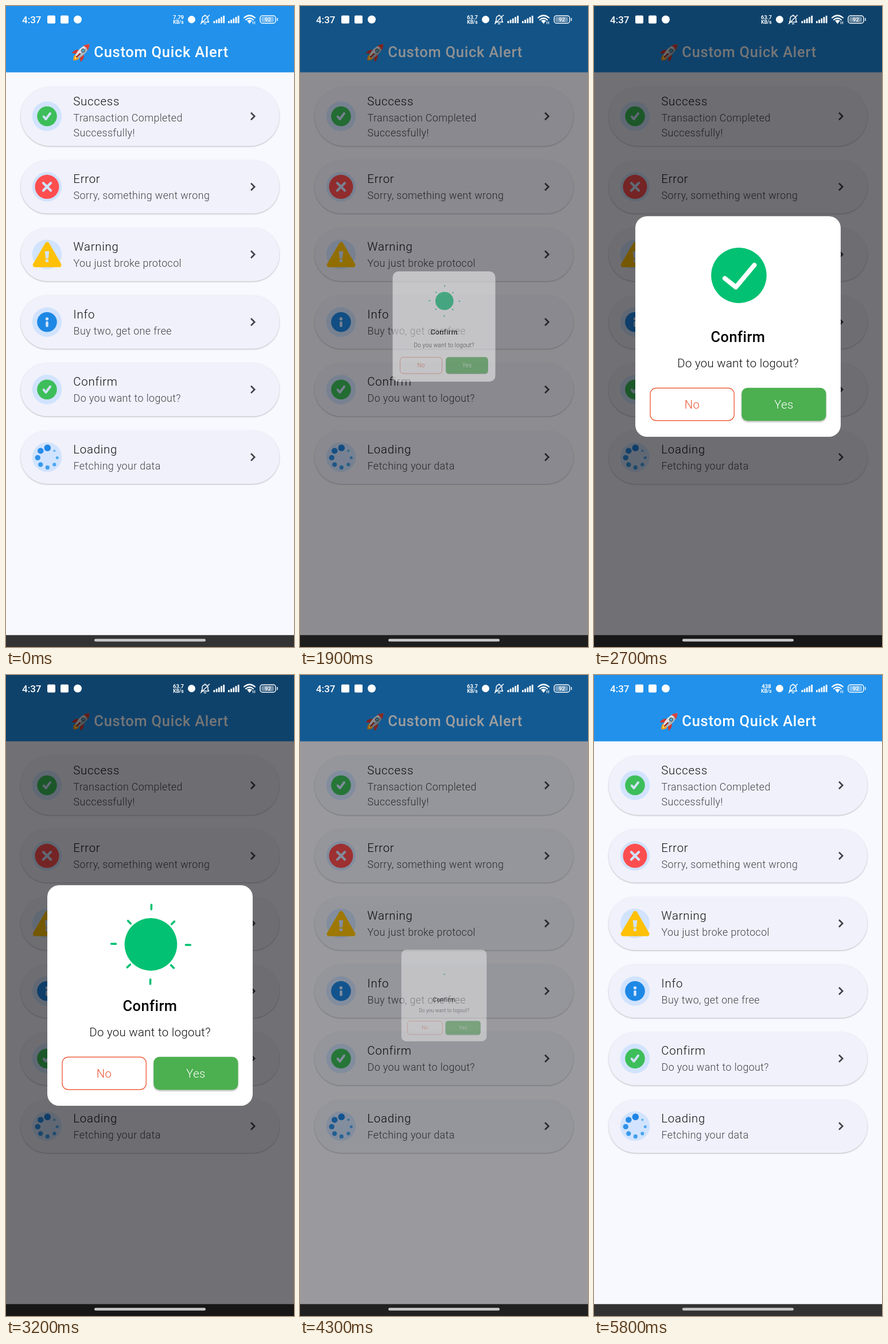
Animation of 502x1116 px, one loop 5.9 s. Source, as an HTML page:

```html
<!DOCTYPE html>
<html lang="en">
<head>
<meta charset="utf-8">
<title>Custom Quick Alert</title>
<style>
  html, body { margin: 0; width: 100%; height: 100%; overflow: hidden; background: #f8f8ff; }
  svg { display: block; width: 502px; height: 1116px; font-family: Roboto, sans-serif; }
  .card { fill: #f0f1fa; filter: drop-shadow(0 1.5px 1.2px rgba(0, 0, 0, .26)); }
  .title { font-size: 20.4px; font-weight: 350; letter-spacing: .74px; fill: #111114; }
  .sub { font-size: 17.9px; font-weight: 350; letter-spacing: .355px; fill: #434249; }
  .body { font-size: 20.4px; font-weight: 350; letter-spacing: .32px; }
  .mid { text-anchor: middle; }
  .line { fill: none; stroke-linecap: round; stroke-linejoin: round; }
  .yes { fill: #4caf50; filter: drop-shadow(0 2px 1.5px rgba(0, 0, 0, .28)); }
</style>
</head>
<body>
<svg viewBox="0 0 502 1116">
  <rect width="502" height="1116" fill="#f8f8ff"/>
  <rect width="502" height="115.500" fill="#2191eb"/>
  <g id="rocket" transform="translate(131.5 80.5) rotate(45)">
    <path d="M-4.500 10Q-6 15 0 20Q6 15 4.500 10Z" fill="#ff9b1a"/>
    <path d="M-2.500 10Q-3 14 0 16.500Q3 14 2.500 10Z" fill="#ffe05a"/>
    <path d="M-4-1Q-12 3-11 13L-4 8ZM4-1Q12 3 11 13L4 8Z" fill="#d0392f"/>
    <path d="M0-20Q8-10 5.500 5L4 11H-4L-5.500 5Q-8-10 0-20Z" fill="#a9b7bf"/>
    <path d="M0-20Q-8-10-5.500 5L-4 11H0Z" fill="#dbe2e6"/>
    <path d="M0-20Q4.500-15 5.700-10Q0-13-5.700-10Q-4.500-15 0-20Z" fill="#d8423a"/>
    <circle cy="-4" r="3.400" fill="#4d5c66"/>
    <circle cy="-4" r="2" fill="#58b8e8"/>
    <path d="M-1.300 3H1.300V13H-1.300Z" fill="#a92c26"/>
  </g>
  <text x="153.300" y="89" font-size="25.5" font-weight="500" letter-spacing=".72" fill="#fff">Custom Quick Alert</text>
  <g id="cards"></g>
  <rect y="1095.300" width="502" height="21" fill="#333"/>
  <rect id="barrier" width="502" height="1116"/>

  <g id="dialog">
    <rect x="72" y="366" width="358" height="384" rx="20.4" fill="#fff"/>
    <g id="rays" class="line" stroke="#03c172" stroke-width="3.6"></g>
    <g id="badge">
      <circle r="48.3" fill="#03c172"/>
      <path id="tick" class="line" d="M-24.500 5.200L-5.200 20.500L27-18" pathLength="1" stroke="#fff" stroke-width="8"/>
    </g>
    <text class="mid" x="251" y="585" font-size="25.5" font-weight="500" letter-spacing=".4">Confirm</text>
    <text class="mid body" x="251" y="629" fill="#111">Do you want to logout?</text>
    <rect x="98" y="665.300" width="146.300" height="56.500" rx="10.2" fill="none" stroke="#ee6340" stroke-width="1.4"/>
    <text class="mid body" x="171" y="700.5" fill="#ee5836">No</text>
    <rect class="yes" x="257.300" y="664.700" width="147.200" height="57.500" rx="10.2"/>
    <text class="mid body" x="331" y="700.5" fill="#fff">Yes</text>
  </g>

  <g id="status" fill="#fff">
    <text x="28" y="30" font-size="17" font-weight="500">4:37</text>
    <rect x="72" y="16.500" width="14" height="14" rx="2"/>
    <rect x="95" y="16.500" width="14" height="14" rx="2"/>
    <circle cx="125" cy="23.500" r="7"/>
    <text id="speed" class="mid" x="300.500" y="22.500" font-size="9.5" font-weight="700"></text>
    <text class="mid" x="300.500" y="31" font-size="8.5" font-weight="700">KB/s</text>
    <circle cx="323.500" cy="23.500" r="6.500"/>
    <g class="line" stroke="#fff" stroke-width="1.5">
      <path d="M340.500 28H353.500L352 25.500V21.500Q351 17 347 17Q343 17 342 21.500V25.500ZM345.500 31H348.500M347 15.500V17M354.500 16L339.500 31"/>
      <rect x="443" y="17" width="27" height="13" rx="4"/>
      <path d="M473 21.500V25.500"/>
    </g>
    <g id="bars"></g>
    <path d="M424.500 31L429 25.500Q424.500 22.500 420 25.500Z"/>
    <g class="line" stroke="#fff" stroke-width="2.2">
      <path d="M415 20.500Q424.500 12.500 434 20.500M418 24Q424.500 18.500 431 24"/>
      <path stroke-width="1.2" d="M430.500 27V31M433.500 27V31"/>
    </g>
    <rect x="445" y="19" width="22" height="9" rx="2" opacity=".4"/>
    <text class="mid" x="456.500" y="27" font-size="9.5" font-weight="500">92</text>
  </g>
  <rect x="154" y="1101.800" width="194" height="4.700" rx="2.35" fill="#c6c6c6"/>
</svg>
<script>
const LOOP = 5900, STEP = 100;
const OPEN = 1800, CLOSE = 4183, FADE = 200;
const BADGE_START = 1790, BADGE_LOOP = 1250;
const PALE = '#d1e3fe';

const $ = id => document.getElementById(id);
const clamp = v => Math.min(1, Math.max(0, v));
const line = (d, width, color = PALE) =>
  `<path class="line" d="${d}" stroke="${color}" stroke-width="${width}"/>`;
const disc = (r, color, x = 0, y = 0) => `<circle cx="${x}" cy="${y}" r="${r}" fill="${color}"/>`;

function loadingDots() {
  let dots = '';
  for (let i = 0; i < 8; i++) {
    const a = -Math.PI / 2 - i * Math.PI / 4;
    const color = `hsl(${209 - i * .5} ${79 + i}% ${51 + i * 2}%)`;
    dots += disc(5.8 - i * .55, color, .8 + 17 * Math.cos(a), 1 + 17 * Math.sin(a));
  }
  return dots;
}

const check = disc(17.3, '#3dbe5a') + line('M-5.800 .5L-2 5L5.500-5', 4);
const icons = {
  check,
  cross: disc(21, '#fd4e4f') + line('M-6.500-6.500L6.500 6.500M6.500-6.500L-6.500 6.500', 4.4),
  warning: '<path d="M.300-17.500L-20.700 18.300H21Z" fill="#ffc107" stroke="#ffc107" stroke-width="8" stroke-linejoin="round"/>'
    + `<path d="M-3.800-5.500H3.800L2.300 7H-2.300Z" fill="${PALE}"/>` + disc(2.8, PALE, 0, 11),
  info: disc(17.3, '#1e88e5') + disc(2.7, PALE, 0, -5.5) + line('M0 1V6.500', 4.6),
  loading: loadingDots()
};

const cards = [
  ['Success', ['Transaction Completed', 'Successfully!'], 'check', 192, 103.5],
  ['Error', ['Sorry, something went wrong'], 'cross', 314.8],
  ['Warning', ['You just broke protocol'], 'warning', 432.5],
  ['Info', ['Buy two, get one free'], 'info', 550.2],
  ['Confirm', ['Do you want to logout?'], 'check', 667.7],
  ['Loading', ['Fetching your data'], 'loading', 785.4]
];
$('cards').innerHTML = cards.map(([title, lines, icon, y, h = 93]) => {
  const base = lines.length > 1 ? -19 : -6.5;
  const subs = lines.map((s, i) =>
    `<text class="sub" x="117.600" y="${base + 28 + i * 25.5}">${s}</text>`).join('');
  return `<g transform="translate(0 ${y})">
    <rect class="card" x="25.500" y="${-h / 2}" width="451" height="${h}" rx="${h / 2}"/>
    <g transform="translate(71.500 0)">${disc(25.7, PALE)}${icons[icon]}</g>
    <text class="title" x="117.300" y="${base}">${title}</text>${subs}
    <path d="M427-6.200L433.200 0L427 6.200" fill="none" stroke="#424248" stroke-width="2.700"/>
  </g>`;
}).join('');

let bars = '';
for (const x of [361.5, 387])
  for (let i = 0; i < 5; i++) {
    const h = 4 + i * 2.3;
    bars += `<rect x="${x + i * 4.2}" y="${30 - h}" width="2.8" height="${h}" rx="1"/>`;
  }
$('bars').innerHTML = bars;

// Flutter's standard ease curve, solved by bisection.
function ease(x) {
  const bez = (a, b, s) => 3 * a * s * (1 - s) ** 2 + 3 * b * s * s * (1 - s) + s ** 3;
  let lo = 0, hi = 1;
  for (let i = 0; i < 20; i++) {
    const m = (lo + hi) / 2;
    if (bez(.25, .25, m) < x) lo = m; else hi = m;
  }
  return bez(.1, 1, lo);
}

function track(keys, t) {
  const i = keys.findIndex(k => k[0] > t);
  if (i < 0) return keys[keys.length - 1][1];
  if (i === 0) return keys[0][1];
  const [t0, v0] = keys[i - 1], [t1, v1] = keys[i];
  return v0 + (v1 - v0) * (t - t0) / (t1 - t0);
}

const badgeScale = [[0, .01], [160, .948], [210, 1], [1170, 1], [1250, .01]];

function drawBadge(phase) {
  $('badge').setAttribute('transform', `translate(252.500 469) scale(${track(badgeScale, phase)})`);

  const drawn = clamp((phase - 165) / 120);
  $('tick').style.display = drawn > 0 ? '' : 'none';
  $('tick').setAttribute('stroke-dasharray', `${drawn} 2`);

  const u = clamp((phase - 90) / 110);
  const length = 30 * Math.min(u, 1 - u);
  let rays = '';
  if (length > 0) for (let i = 0; i < 8; i++) {
    const inner = 47 + 22 * u - (i % 2 ? 10.5 : 0);
    const len = (length - 3) * (i % 2 ? .85 : 1);
    rays += `<path d="M${inner} 0h${Math.max(0, len)}" transform="translate(252.500 469) rotate(${i * 45 + .8})"/>`;
  }
  $('rays').innerHTML = rays;
}

function render(ms) {
  const t = Math.floor(ms % LOOP / STEP) * STEP;
  const shown = t < CLOSE ? clamp((t - OPEN) / FADE) : 1 - clamp((t - CLOSE) / FADE);
  $('barrier').setAttribute('opacity', shown > 0 ? .54 * ease(shown) : 0);
  $('dialog').style.display = shown > 0 ? '' : 'none';
  $('dialog').setAttribute('opacity', shown);
  $('dialog').setAttribute('transform', `translate(251 558) scale(${shown}) translate(-251 -558)`);
  if (shown > 0) drawBadge((t - BADGE_START) % BADGE_LOOP);
  $('speed').textContent = t < 800 ? '7.79' : t < 4800 ? '63.7' : '438';
}

const start = performance.now();
function tick() {
  render(performance.now() - start);
  requestAnimationFrame(tick);
}
tick();
</script>
</body>
</html>
```
